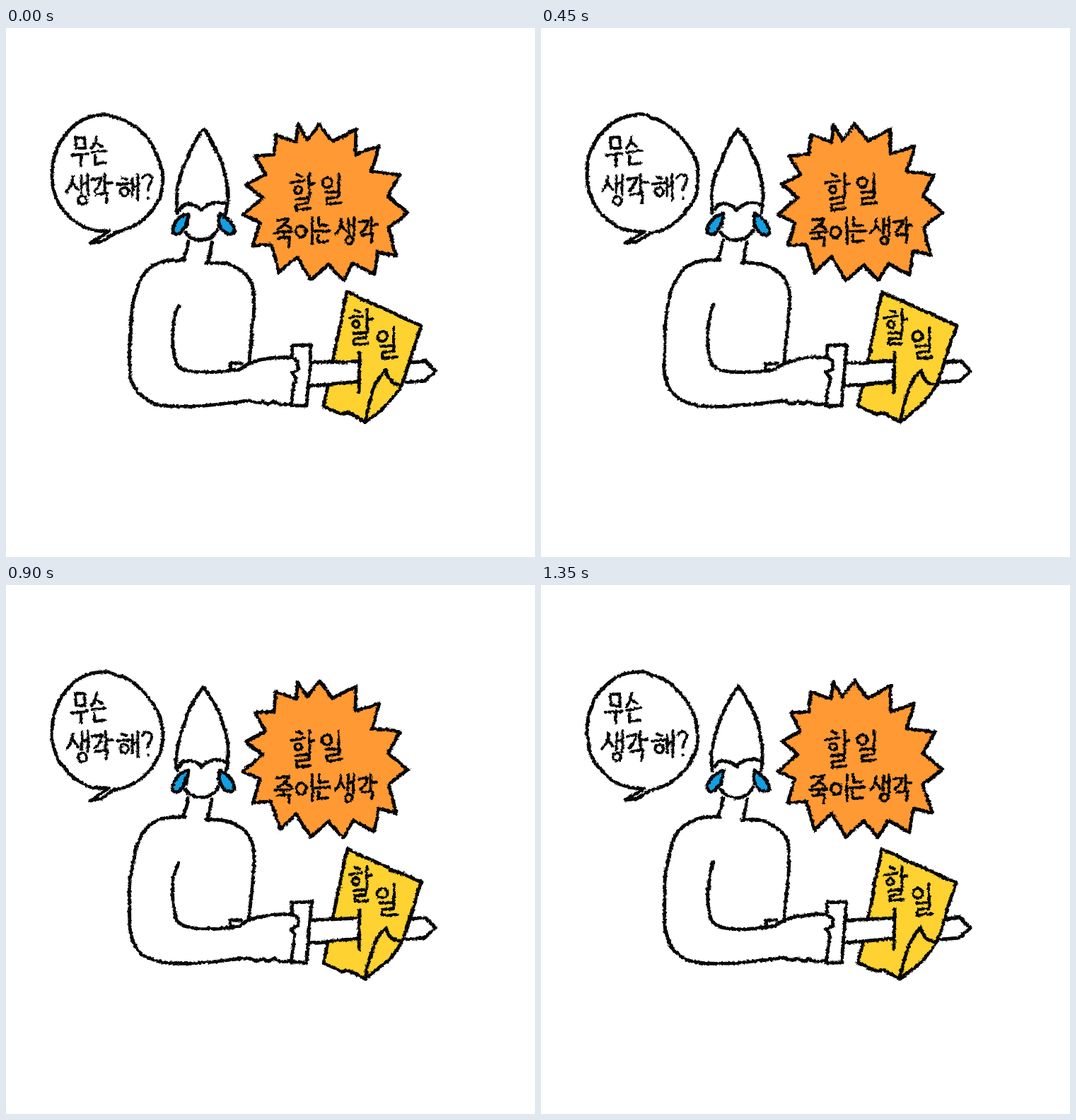
Animation of 748 by 748 pixels, one loop 1500 ms. Source, as an HTML page:

```html
<!DOCTYPE html>
<html lang="ko">
<head>
<meta charset="utf-8">
<title>할 일</title>
<style>
html, body { margin: 0; width: 100%; height: 100%; overflow: hidden; background: #fff; }
svg { display: block; width: 100vw; height: 100vh; }
.ink { fill: none; stroke: #080808; stroke-width: 4.9; stroke-linecap: round; stroke-linejoin: round; }
#words { stroke-width: 3.9; }
#words path { vector-effect: non-scaling-stroke; }
.white { fill: #fff; }
.orange { fill: #ff9933; }
.yellow { fill: #fdd231; }
.blue { fill: #149fe2; }
</style>
</head>
<body>
<svg viewBox="0 0 748 748" role="img" aria-label="무슨 생각해? 할 일 죽이는 생각. 할 일">
  <filter id="crayon" filterUnits="userSpaceOnUse" x="0" y="0" width="748" height="748" color-interpolation-filters="sRGB">
    <feTurbulence id="wobble" type="fractalNoise" baseFrequency=".03" numOctaves="2" result="slow"/>
    <feTurbulence id="grain" type="fractalNoise" baseFrequency=".28" numOctaves="2" result="fast"/>
    <feDisplacementMap in="SourceGraphic" in2="slow" scale="3.5" xChannelSelector="R" yChannelSelector="G" result="bent"/>
    <feDisplacementMap in="bent" in2="fast" scale="4" xChannelSelector="R" yChannelSelector="G"/>
  </filter>

  <g class="ink" filter="url(#crayon)">
    <!-- speech bubble -->
    <path d="M146 288L119 304 136 302 155 290C195 281 222 250 222 211C222 181 201 152 177 136C167 130 160 127 157 128C150 123 142 122 135 123C95 125 65 163 65 208C65 252 98 289 146 288Z"/>

    <!-- burst -->
    <path class="orange" d="M443 136L462 160 495 143 494 178 528 167 517 203 557 208 540 238 568 261 541 282 552 322 526 316 521 349 491 333 477 357 456 334 431 357 411 323 387 346 375 306 349 308 359 275 335 264 363 240 340 221 367 207 352 181 379 179 381 151 410 161 413 137 426 158Z"/>

    <!-- head -->
    <path d="M242 262C237 222 255 177 279 143C305 177 319 221 311 262"/>
    <path d="M246 257C250 246 266 245 276 258C284 249 297 243 311 249"/>
    <path d="M254 289C264 304 289 305 300 286M257 266L255 281M302 266L302 281"/>
    <path class="blue" d="M258 262Q240 267 235 284 235 294 245 291 257 281 258 262Z"/>
    <path class="blue" d="M302 262Q299 280 310 290 319 295 323 289 323 272 302 262Z"/>
    <path d="M258 301Q256 316 249 328M291 303L286 332"/>

    <!-- body and arm -->
    <path d="M253 328C214 326 196 338 185 367C174 402 174 447 175 482C177 517 197 533 236 535C280 537 310 530 345 527Q355 533 364 528 370 535 379 528 388 535 402 531"/>
    <path d="M284 332C322 330 346 345 350 372C353 402 346 440 344 472"/>
    <path d="M244 392C234 412 233 451 241 474C250 491 294 488 330 482C345 472 365 464 405 466M333 474L317 474 318 483"/>

    <!-- note on the sword -->
    <path class="white" d="M573 472L593 470 607 485 592 499 566 501"/>
    <path class="yellow" d="M482 373L587 421 560 504C550 525 528 543 508 557L484 544 474 546 449 535Z"/>
    <path d="M508 557C514 521 524 496 537 484Q542 506 560 504"/>
    <path class="white" stroke="none" d="M431 474L498 471 497 500 429 506Z"/>
    <path d="M431 474L498 471M429 506L497 500M500 459L499 515"/>
    <path class="white" d="M405 449L432 448 425 534 403 534 406 512 409 495 403 487 413 482 412 470 404 466Z"/>

    <g id="words"></g>
  </g>
</svg>

<script>
// Pen strokes of the hand lettering, one entry per syllable
const pen = {
  무: 'M6 2L7 17H20L19 1ZM0 27L23 25M14 26L14 42',
  슨: 'M8 0Q7 11 1 17M8 9L16 15M1 23L21 21M5 28V40L20 38',
  생: 'M9 3Q8 17 0 25M8 12L16 22M21 2V26M21 14L29 12M30 0V29M22 31a6 6 0 1 0 1 0',
  각: 'M0 7L14 5Q12 17 3 24M19 0V26M19 13L29 12M5 29L22 27 20 41',
  해: 'M7 4L14 6M0 14L19 12M10 19a6 6 0 1 0 1 0M22 5V31M22 18L29 16M30 0V37',
  '?': 'M0 5C4-3 16 0 13 9C12 14 8 15 8 23M8 34v1',
  할: 'M10 1L17 4M1 13L21 10M11 18a5 5 0 1 0 1 0M28 0V31M28 16L35 14M8 36L27 34 26 42 9 44 9 52 29 50',
  일: 'M8 6a7 7 0 1 0 1 0M25 0V24M6 27L26 26 25 34 8 36 8 44 29 42',
  죽: 'M3 4L20 2Q16 12 4 17M13 10L23 16M0 22L25 20M13 21V29M4 30L21 28 20 40',
  이: 'M8 12a7 8 0 1 0 1 0M24 0V37',
  는: 'M5 0V11L17 10M0 19L21 18M4 24V34L18 33'
};
const squareLoop = 'M2 13L3 26 16 25 15 12ZM24 0V37';
const $ = id => document.getElementById(id);

function write(text, xs, y, scale = 1) {
  return [...text].map((char, i) => {
    const path = document.createElementNS('http://www.w3.org/2000/svg', 'path');
    path.setAttribute('d', pen[char]);
    path.setAttribute('transform', `translate(${xs[i]} ${y}) scale(${scale})`);
    return $('words').appendChild(path);
  });
}

write('무슨', [92, 120], 153);
write('생각해?', [86, 122, 157, 193], 207, .98);
write('할일', [402, 446], 206, .98);
const [, loop] = write('죽이는', [380, 409, 437], 268);
write('생각', [466, 499], 268, .87);
write('할', [484], 398, .95);
write('일', [524], 423);

// The whole drawing is re-inked ten times per loop
let last = -1;
function draw(now) {
  const pose = Math.floor(now / 150) % 10;
  if (pose !== last) {
    last = pose;
    $('wobble').setAttribute('seed', pose * 7 + 3);
    $('grain').setAttribute('seed', pose * 5 + 1);
    loop.setAttribute('d', pose === 4 || pose === 5 ? squareLoop : pen.이);
  }
  requestAnimationFrame(draw);
}
draw(performance.now());
</script>
</body>
</html>
```
